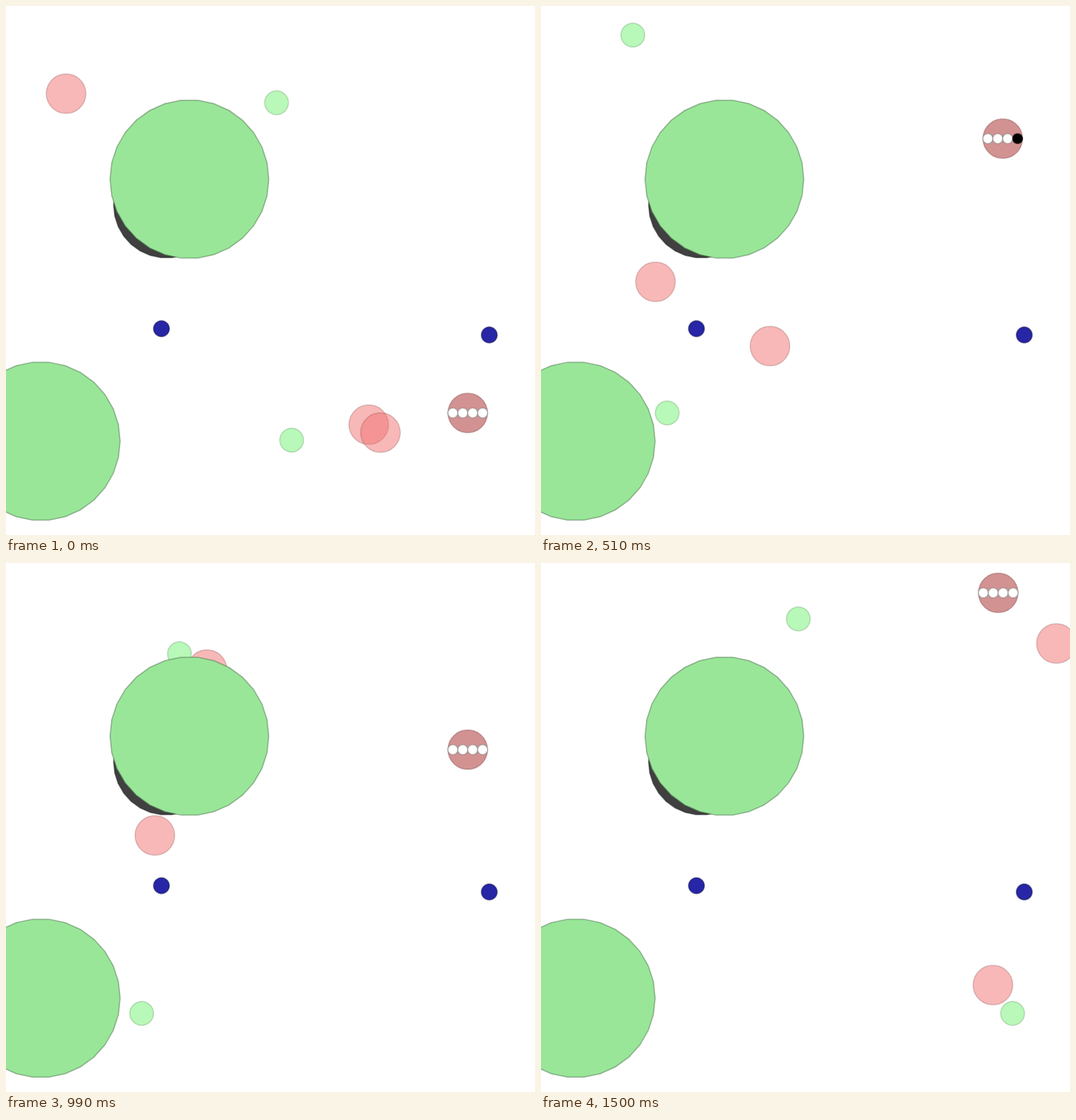
Recreate the animation shown at these times as an HTML page. Size 700x700 px, loop 1530 ms.

```html
<!DOCTYPE html>
<html lang="en">
<head>
<meta charset="utf-8">
<title>Particle world</title>
<style>
html, body { margin: 0; width: 100%; height: 100%; overflow: hidden; background: #fff; }
svg { display: block; width: 100vw; height: 100vh; }
</style>
</head>
<body>
<svg id="stage" viewBox="0 0 700 700"></svg>
<script>
const STEP = 30, STEPS = 51;
const TIMES = [0, 8, 17, 23, 33, 42, 50];
const BOUNCE = 4; // waypoint at which some agents rebound
const stage = document.getElementById('stage');
const PINK = [242, 115, 115], GREEN = [115, 242, 115], RED = [166, 38, 38];
const FOREST = [153, 230, 153], BLUE = [38, 38, 166], DARK = [64, 64, 64], WHITE = [255, 255, 255];
const HUNTER = 26.25, PREY = 15.75, DOT = HUNTER / 4;

function add(tag, parent, attrs) {
  const el = document.createElementNS('http://www.w3.org/2000/svg', tag);
  for (const k in attrs) el.setAttribute(k, attrs[k]);
  parent.appendChild(el);
  return el;
}

// Every disc is a 30-sided polygon with a half-bright, half-opaque outline.
function disc(parent, r, color, alpha, x = 0, y = 0) {
  const pts = Array.from({ length: 30 }, (_, i) => {
    const a = i * Math.PI / 15;
    return (x + r * Math.cos(a)).toFixed(2) + ',' + (y + r * Math.sin(a)).toFixed(2);
  });
  return add('polygon', parent, {
    points: pts.join(' '),
    fill: `rgb(${color})`, 'fill-opacity': alpha,
    stroke: `rgb(${color.map(c => Math.round(c / 2))})`,
    'stroke-opacity': alpha / 2, 'stroke-width': 1.5
  });
}

// Each path gives the agent's place at successive TIMES.
const agents = [
  { r: HUNTER, color: RED, path: [[611, 538.5], [611, 367], [611, 175.5], [611, 160], [611, 247], [611, 82], [605, 39.5]] },
  { r: HUNTER, color: PINK, bounces: true,
    path: [[79.5, 116], [285, 178], [290, 178], [361, 175], [266, 141], [440.5, 132], [682, 106.5]] },
  { r: HUNTER, color: PINK, path: [[480, 554], [388, 316.5], [151.5, 365], [5, 246], [-150, 120]] },
  { r: HUNTER, color: PINK, bounces: true,
    path: [[495.5, 564.5], [385, 440], [303, 450], [298, 495], [197, 360.5], [384, 499], [598, 558.5]] },
  { r: PREY, color: GREEN, bounces: true,
    path: [[358, 128], [242.5, 83.5], [121.5, 38.5], [90, 37], [229.5, 120], [218, 47], [340.5, 74]] },
  { r: PREY, color: GREEN,
    path: [[378, 574.5], [151, 574.5], [167, 538.5], [157.5, 586], [179.5, 596], [575, 596], [624, 596]] }
];

// Channel the leader signals around a waypoint
const signals = { 2: 3, 3: 0, 5: 0 };

// Smooth curve through the waypoints; velocity is free at the ends and at a bounce.
function along(agent, axis, n) {
  const p = agent.path.map(k => k[axis]), last = p.length - 1;
  const i = TIMES.findIndex((t, k) => k < last && n <= TIMES[k + 1]);
  if (i < 0) return p[last];
  const slope = (a, b) => (p[b] - p[a]) / (TIMES[b] - TIMES[a]);
  const free = k => k === 0 || k === last || (agent.bounces && k === BOUNCE);
  const mean = slope(i, i + 1);
  let u = free(i) ? null : slope(i - 1, i + 1);
  const v = free(i + 1) ? 1.5 * mean - (u ?? mean) / 2 : slope(i, i + 2);
  u ??= 1.5 * mean - v / 2;
  const h = TIMES[i + 1] - TIMES[i], t = (n - TIMES[i]) / h, s = 1 - t;
  return s * s * ((1 + 2 * t) * p[i] + t * h * u) + t * t * ((1 + 2 * s) * p[i + 1] - s * h * v);
}

disc(stage, 70, DARK, 1, 212.4, 263.4);
disc(stage, 10.5, BLUE, 1, 205.7, 427);
disc(stage, 10.5, BLUE, 1, 639.5, 435.3);
for (const a of agents) {
  a.el = add('g', stage, {});
  disc(a.el, a.r, a.color, 0.5);
}
const dots = [-3, -1, 1, 3].map(k => disc(agents[0].el, DOT, WHITE, 1, k * DOT));
disc(stage, 105, FOREST, 1, 242.7, 229.2);
disc(stage, 105, FOREST, 1, 46, 575.8);

function draw(n) {
  for (const a of agents) {
    const x = along(a, 0, n), y = along(a, 1, n);
    a.el.setAttribute('transform', `translate(${x.toFixed(2)} ${y.toFixed(2)})`);
  }
  const lit = signals[TIMES.findIndex(t => Math.abs(n - t) <= 2)];
  dots.forEach((d, i) => {
    d.setAttribute('fill', i === lit ? '#000' : '#fff');
    d.setAttribute('stroke', i === lit ? '#000' : '#808080');
  });
}

const start = performance.now();
function tick() {
  draw(Math.floor((performance.now() - start) / STEP) % STEPS);
  requestAnimationFrame(tick);
}
draw(0);
requestAnimationFrame(tick);
</script>
</body>
</html>
```
